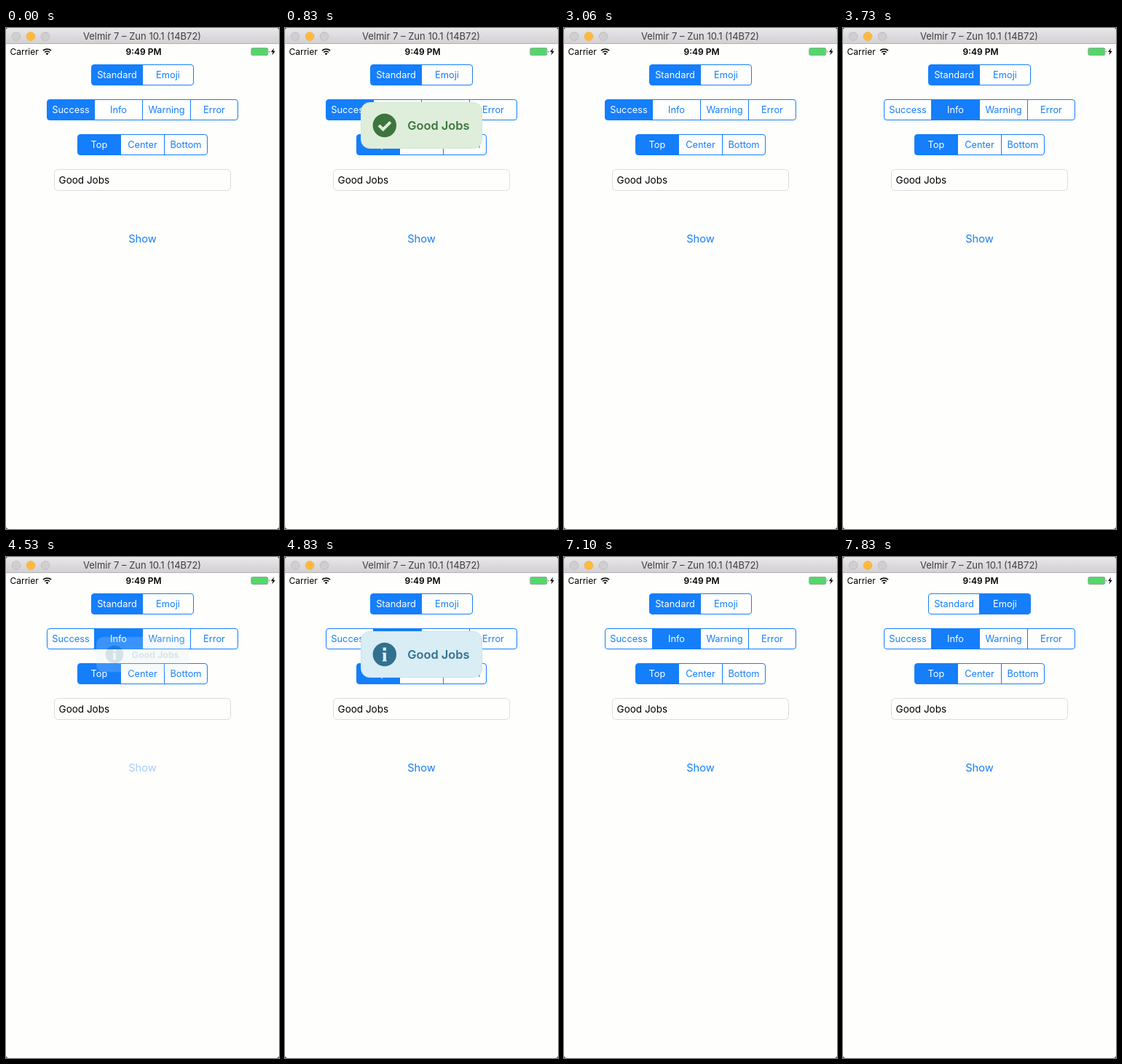
An HTML page that plays this animation: 375 by 689 pixels, repeating every 8000 ms.

```html
<!DOCTYPE html>
<html lang="en">
<head>
<meta charset="utf-8">
<title>Toast demo</title>
<style>
  html, body { margin: 0; width: 100%; height: 100%; overflow: hidden; background: #24474a; }
  svg { display: block; width: 100%; height: 100%; }
  text { font-family: Inter, Roboto, sans-serif; }
  .segment text { font-size: 12.8px; text-anchor: middle; }
</style>
</head>
<body>
<svg id="stage" viewBox="0 0 375 689">
  <defs>
    <linearGradient id="bar" x2="0" y2="1">
      <stop stop-color="#e9e7e9"/><stop offset="1" stop-color="#d1cfd1"/>
    </linearGradient>
  </defs>

  <!-- Window and title bar -->
  <rect width="375" height="689" rx="4" fill="#fefefd"/>
  <path d="M0 22V4a4 4 0 0 1 4-4H371a4 4 0 0 1 4 4V22z" fill="url(#bar)"/>
  <path d="M0 21.5H375" stroke="#b5b3b5"/>
  <g fill="#d0ced0" stroke="#b9b7b9" stroke-width=".8">
    <circle cx="14" cy="11.5" r="5.8"/>
    <circle cx="34" cy="11.5" r="5.8" fill="#fdba3e" stroke="#f0ac38"/>
    <circle cx="54" cy="11.5" r="5.8"/>
  </g>
  <text x="187" y="16" font-size="13" text-anchor="middle" fill="#403e40">Velmir 7 – Zun 10.1 (14B72)</text>

  <!-- Status bar -->
  <text x="5.5" y="37" font-size="12">Carrier</text>
  <g fill="none" stroke="#000" stroke-width="1.7">
    <path d="M51 31.2a8 8 0 0 1 11 0M53.1 33.5a5 5 0 0 1 6.8 0"/>
    <path d="M56.5 37.2l-1.9-2a2.8 2.8 0 0 1 3.8 0z" fill="#000" stroke="none"/>
  </g>
  <text x="189" y="37" font-size="12" font-weight="600" text-anchor="middle">9:49 PM</text>
  <rect x="336.8" y="27.5" width="23" height="10" rx="1.8" fill="#53d769" stroke="#8d9a92" stroke-width=".8"/>
  <path d="M361 30.8q1.6 1.7 0 3.4z" fill="#444"/>
  <path d="M368.3 27.6L364 33h2.6l-1.2 4.4 4.4-5.6h-2.7z"/>

  <g id="controls"></g>

  <rect x="66.5" y="194.5" width="242" height="29" rx="5" fill="#fefefd" stroke="#dcdcdc"/>
  <text x="72.6" y="214" font-size="13.5">Good Jobs</text>
  <text id="show" x="187.5" y="294.5" font-size="14.7" text-anchor="middle" fill="#157efb">Show</text>

  <g id="toast">
    <rect id="card" x="104.5" y="102.5" width="166" height="63" rx="12"/>
    <circle id="disc" cx="136.8" cy="134" r="16.2"/>
    <path id="check" d="M129 133.8l5.7 5.7 10.2-10.2" fill="none" stroke-width="4"/>
    <path id="info" d="M134.6 124.6h4.3v4.1h-4.3zM133.9 131.4h5v10.6h.8v1.6h-5.8v-1.6h.8v-9h-.8z"/>
    <text id="message" x="168.2" y="140" font-size="16.4" font-weight="600">Good Jobs</text>
  </g>
</svg>

<script>
const LOOP = 8000;
const BLUE = [21, 126, 251];
const WHITE = [255, 255, 255];
const THEMES = {
  check: { back: '#deeedb', edge: '#d3e7ca', ink: '#3c763d' },
  info: { back: '#d9edf4', edge: '#c4e3ef', ink: '#31708f' }
};
const TOASTS = [
  { icon: 'check', press: 260, enter: 385, leave: 2720 },
  { icon: 'info', press: 4330, enter: 4410, leave: 6778 }
];
const ENTER_MS = 430, LEAVE_MS = 325, SMALL = 0.7;

const byId = id => document.getElementById(id);
const clamp = v => Math.max(0, Math.min(1, v));
const ease = p => p * p * (3 - 2 * p);
const fade = (t, start, end) => ease(clamp((t - start) / (end - start)));
const blend = (a, b, p) => `rgb(${a.map((v, i) => Math.round(v + (b[i] - v) * p))})`;
const accent = `rgb(${BLUE})`;

function set(node, attributes) {
  for (const name in attributes) node.setAttribute(name, attributes[name]);
}

function add(parent, tag, attributes, text = '') {
  const node = document.createElementNS('http://www.w3.org/2000/svg', tag);
  set(node, attributes);
  node.textContent = text;
  parent.append(node);
  return node;
}

// edges: x of the left side, each divider and the right side
function segmentedControl(top, edges, labels) {
  const left = edges[0], right = edges[edges.length - 1];
  const group = add(byId('controls'), 'g', { class: 'segment' });
  const frame = { x: left, y: top, width: right - left, height: 28, rx: 3.5 };
  const clip = add(group, 'clipPath', { id: `clip${top | 0}` });
  add(clip, 'rect', frame);
  const fills = add(group, 'g', { 'clip-path': `url(#${clip.id})` });
  const segments = labels.map((label, i) => {
    const x = edges[i], width = edges[i + 1] - x;
    return {
      fill: add(fills, 'rect', { x, y: top, width, height: 28, fill: accent }),
      label: add(group, 'text', { x: x + width / 2, y: top + 18.6 }, label)
    };
  });
  const dividers = edges.slice(1, -1).map(x => `M${x} ${top}v28`).join('');
  const outline = { fill: 'none', stroke: accent };
  add(group, 'rect', { ...frame, ...outline });
  add(group, 'path', { d: dividers, ...outline });
  return segments;
}

function paintSegment({ fill, label }, selected, pressed = 0) {
  set(fill, { 'fill-opacity': selected + (1 - selected) * pressed * 0.2 });
  set(label, { fill: blend(BLUE, WHITE, selected) });
}

const style = segmentedControl(50.5, [117.5, 187.5, 257.5], ['Standard', 'Emoji']);
const kind = segmentedControl(98.5, [56.5, 121.5, 187.5, 253.5, 318.5], ['Success', 'Info', 'Warning', 'Error']);
const place = segmentedControl(146.5, [98.5, 157.5, 217.5, 276.5], ['Top', 'Center', 'Bottom']);
[...kind, ...place].forEach(segment => paintSegment(segment, 0));
paintSegment(place[0], 1);

function switchSegment(from, to, t, press, start, end) {
  const p = fade(t, start, end);
  paintSegment(from, 1 - p);
  paintSegment(to, p, t >= press ? 1 : 0);
}

function paintToast(t) {
  const { icon, press, enter, leave } = TOASTS[t < TOASTS[1].press ? 0 : 1];
  const { back, edge, ink } = THEMES[icon];
  const shown = fade(t, enter, enter + ENTER_MS) * (1 - fade(t, leave, leave + LEAVE_MS));
  const scale = SMALL + (1 - SMALL) * shown;
  set(byId('toast'), {
    opacity: shown,
    transform: `translate(187.5 134) scale(${scale}) translate(-187.5 -134)`
  });
  set(byId('card'), { fill: back, stroke: edge });
  set(byId('disc'), { fill: ink });
  set(byId('message'), { fill: ink });
  set(byId('check'), { stroke: back });
  set(byId('info'), { fill: back });
  for (const name in THEMES) set(byId(name), { visibility: name === icon ? 'inherit' : 'hidden' });

  const dimmed = t >= press ? 1 - fade(t, enter, enter + 400) : 0;
  set(byId('show'), { opacity: 1 - 0.8 * dimmed });
}

function draw(now) {
  const t = now % LOOP;
  switchSegment(kind[0], kind[1], t, 3430, 3510, 3730);
  switchSegment(style[0], style[1], t, 7460, 7580, 7830);
  paintToast(t);
}

const begin = performance.now();
function tick() {
  draw(performance.now() - begin);
  requestAnimationFrame(tick);
}
tick();
</script>
</body>
</html>
```
